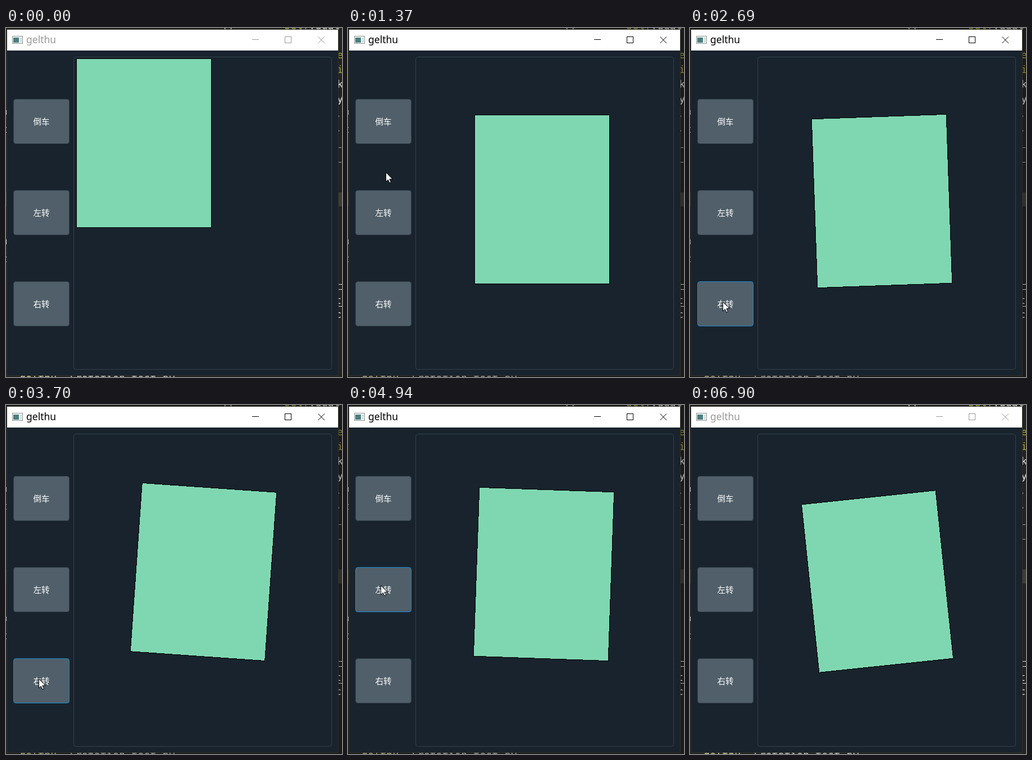
An HTML page that plays this animation: 598x620 px, repeating every 6.97 s.

```html
<!DOCTYPE html>
<html lang="zh">
<head>
<meta charset="utf-8">
<style>
  html, body { margin: 0; width: 100%; height: 100%; overflow: hidden; background: #23241f; }
  svg { display: block; width: 598px; height: 620px; }
  text { white-space: pre; }
  .code { font: 18.4px "DejaVu Sans Mono", monospace; fill: #e6e6e0; }
  .title { font: 17.5px "Noto Sans", sans-serif; }
  .btn rect { fill: #505f69; stroke: #32414b; }
  .btn.hover rect { stroke: #148cd2; }
  .btn.down rect { fill: #19232d; }
  .btn text { font: 300 14.6px "Noto Sans CJK SC", "Noto Sans CJK", sans-serif; fill: #fff; text-anchor: middle; }
  .chrome { --ink: #999; }
  .active .chrome { --ink: #000; }
  .shade { opacity: 0; }
  .active .shade { opacity: .22; }
</style>
</head>
<body>
<svg id="stage" viewBox="0 0 598 620">
  <rect width="598" height="620" fill="#23241f"/>
  <rect y="292" width="598" height="25" fill="#3e3d32"/>
  <g id="editor" class="code">
    <text x="384" y="2">(|</text>
    <text x="495" y="2" fill="#b5bd2e">self<tspan fill="#e6e6e0">.quat</tspan></text>
    <text x="24" y="628" fill="#d8d8a0">gelthu<tspan fill="#ccc"> .\rotation_test.py</tspan></text>
    <path d="M591 455.5h7M591 464.5h7M591 494.5h7" stroke="#e6e6e0"/>
  </g>
  <rect class="shade" width="598" height="620"/>

  <rect x="1" y="2" width="591" height="616" fill="#30302c"/>
  <rect x="2" y="40" width="589" height="577" fill="#19232d"/>
  <g class="chrome">
    <rect x="2" y="3" width="589" height="37" fill="#fff"/>
    <rect x="11.5" y="14.5" width="18" height="13" fill="#f4f6f6" stroke="#8b9494"/>
    <rect x="13" y="17" width="10" height="9" fill="#4b7f80"/>
    <path d="M25 18.5h3M25 21.5h3M25 24.5h3" stroke="#a9b2b2"/>
    <text class="title" x="36" y="27" fill="var(--ink)">gelthu</text>
    <g fill="none" stroke="var(--ink)">
      <path d="M438 20.5h12"/>
      <rect x="496.5" y="15.5" width="11" height="11"/>
      <path d="M555.5 15.5l11.5 11.5M567 15.5l-11.5 11.5"/>
    </g>
  </g>
  <rect x="120.5" y="51.5" width="459" height="555" rx="4" fill="none" stroke="#32414b"/>
  <rect id="car" x="-120" y="-150" width="240" height="300" fill="#7fd7b2" stroke="#000" shape-rendering="crispEdges"/>
  <g id="buttons"></g>
  <g id="cursor">
    <path d="M.5 .5V17L4.3 13.4L6.9 19.2L9.4 18.1L6.9 12.4H12.2Z" fill="#fff" stroke="#000"/>
    <circle id="halo" r="15" fill="#ff0" fill-opacity=".5"/>
  </g>
</svg>
<script>
const LOOP = 6970, TICK = 76.6;
const $ = id => document.getElementById(id);
const NS = "http://www.w3.org/2000/svg";

function add(parent, tag, attrs, text) {
  const el = document.createElementNS(NS, tag);
  for (const k in attrs) el.setAttribute(k, attrs[k]);
  if (text) el.textContent = text;
  return parent.appendChild(el);
}

// Code peeking out beside the window
const olive = "#a8a02a";
[["e", 54, olive], ["i", 80, olive], ["k", 106], ["y", 132], [".s", 158], [".s", 184],
 ["_e", 209], ["_e", 235], ["te", 490], ["cs", 515]].forEach(([s, y, fill = "#e6e6e0"]) =>
  add($("editor"), "text", { x: s.length > 1 ? 586 : 589, y, fill }, s));
[["p", 155], ["t", 186], ["p", 385], ["t", 416]].forEach(([s, y]) =>
  add($("editor"), "text", { x: -8, y }, s));

const tops = [126, 288, 450];
const buttons = ["倒车", "左转", "右转"].map((label, i) => {
  const g = add($("buttons"), "g", { class: "btn" });
  add(g, "rect", { x: 13.5, y: tops[i] + .5, width: 99, height: 79, rx: 4 });
  add(g, "text", { x: 63, y: tops[i] + 45.5 }, label);
  return g;
});

// [time, degrees]
const turns = [[0, 0], [1840, -2], [2140, -4], [2690, -2], [3010, 0], [3390, 2], [3700, 4],
  [4180, 6], [4700, 4], [4940, 2], [5260, 0], [5490, -2], [5800, -4], [6190, -6]];
// [down, up]
const presses = [[610, 690], [1760, 1840], [2070, 2140], [2620, 2690], [3620, 3700], [4100, 4180],
  [4620, 4700], [4870, 4940], [5410, 5490], [5720, 5800], [6120, 6190]];
// [time, x, y]
const path = [[0, 82, 640], [530, 63, 172], [1200, 63, 172], [1520, 70, 322], [1680, 72, 329],
  [2230, 72, 329], [2590, 58, 486], [4200, 58, 486], [4560, 58, 320], [6210, 58, 320],
  [6430, 90, 640], [LOOP, 90, 640]];

function pointer(t) {
  const i = Math.max(1, path.findIndex(p => p[0] > t));
  const [t0, x0, y0] = path[i - 1], [t1, x1, y1] = path[i];
  const u = (t - t0) / (t1 - t0);
  return [Math.round(x0 + (x1 - x0) * u), Math.round(y0 + (y1 - y0) * u)];
}

function carPose(t, tick) {
  const deg = turns.filter(s => s[0] <= t).pop()[1];
  const a = deg * Math.PI / 180;
  const d = Math.min(100, Math.max(0, Math.floor((tick - 8.5) * 13.5)));
  const x = 245.5 + Math.floor(d * (Math.cos(a) + Math.sin(a)));
  const y = 204.5 + Math.floor(d * (Math.cos(a) - Math.sin(a)));
  return `translate(${x} ${y}) rotate(${deg})`;
}

function draw(t) {
  const tick = Math.floor((t + 10) / TICK);
  const down = presses.some(([a, b]) => t >= a && t < b);
  const [x, y] = pointer(tick * TICK);
  $("stage").classList.toggle("active", t >= 610 && t < 6900);
  $("car").setAttribute("transform", carPose(t, tick));
  $("cursor").setAttribute("transform", `translate(${x} ${y})`);
  $("halo").style.display = down ? "" : "none";
  buttons.forEach((b, i) => {
    const over = x >= 13 && x < 113 && y >= tops[i] && y < tops[i] + 80;
    b.classList.toggle("hover", over);
    b.classList.toggle("down", over && down);
  });
}

const start = performance.now();
function frame() {
  draw((performance.now() - start) % LOOP);
  requestAnimationFrame(frame);
}
frame();
</script>
</body>
</html>
```
